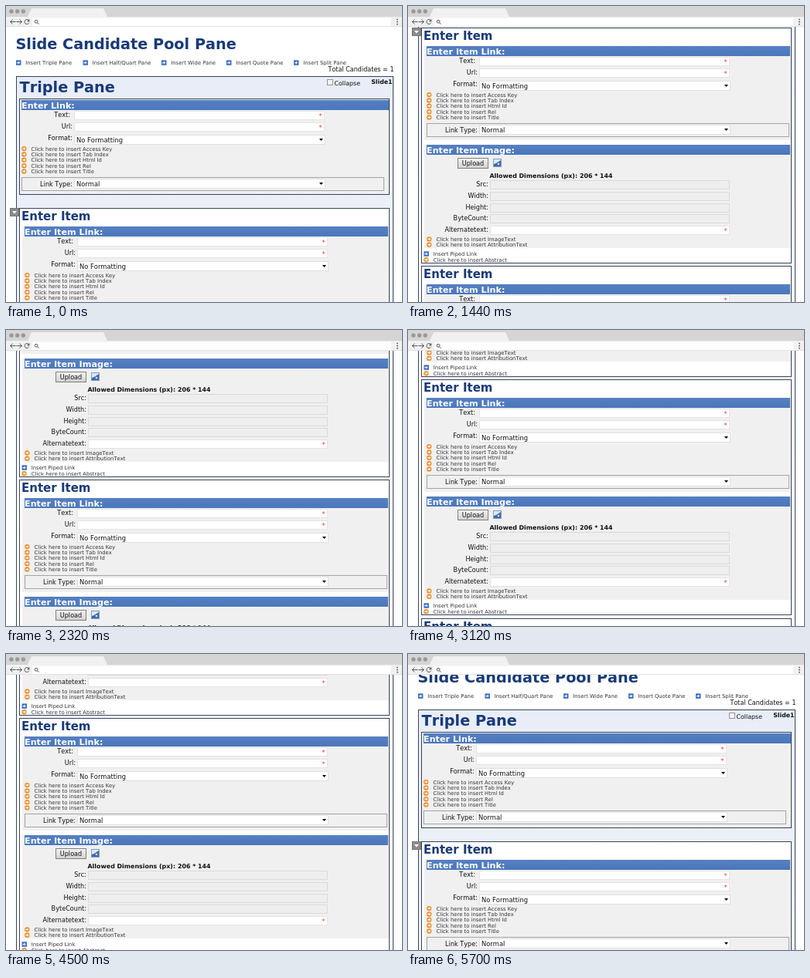
An HTML page with a canvas that plays this animation: 512x384 px, repeating every 5780 ms.

```html
<!DOCTYPE html>
<html lang="en">
<head>
<meta charset="utf-8">
<title>Scrolling form</title>
<style>
html, body { margin: 0; width: 100%; height: 100%; overflow: hidden; background: #fff; }
canvas { display: block; width: 512px; height: 384px; }
</style>
</head>
<body>
<canvas id="stage" width="512" height="384"></canvas>
<script>
const ctx = document.getElementById('stage').getContext('2d');
const W = 512, H = 384, CHROME = 27;
const LOOP = 5780, STEP = 80, RESUME = 4260;
const MAX_SCROLL = 614, DOWN = 13, UP = 31.3;
const NAVY = '#193a78', INK = '#111', LINE = '#39435a', PANEL = '#f0f0f0';
const LABEL = 8.15, SMALL = 6.8;

function fill(x, y, w, h, color) {
  ctx.fillStyle = color;
  ctx.fillRect(x, y, w, h);
}

function box(x, y, w, h, color, border) {
  if (color) fill(x, y, w, h, color);
  ctx.strokeStyle = border;
  ctx.lineWidth = 1;
  ctx.strokeRect(x + .5, y + .5, w - 1, h - 1);
}

function text(str, x, y, size, color = INK, bold = false, align = 'left') {
  ctx.font = `${bold ? 'bold ' : ''}${size}px "DejaVu Sans", Verdana, sans-serif`;
  ctx.fontKerning = 'none';
  ctx.textAlign = align;
  ctx.fillStyle = color;
  ctx.fillText(str, x, y);
}

function label(str, right, y) {
  text(str, right, y, LABEL, INK, false, 'right');
}

function shape(points, color) {
  ctx.fillStyle = color;
  ctx.beginPath();
  points.forEach(([x, y]) => ctx.lineTo(x, y));
  ctx.fill();
}

function path(points, color, width) {
  ctx.strokeStyle = color;
  ctx.lineWidth = width;
  ctx.beginPath();
  points.forEach(([x, y]) => ctx.lineTo(x, y));
  ctx.stroke();
}

function disc(x, y, r, color) {
  ctx.fillStyle = color;
  ctx.beginPath();
  ctx.arc(x, y, r, 0, Math.PI * 2);
  ctx.fill();
}

function arrowGlyph(x, y) {
  fill(x - 2, y - .6, 2.4, 1.2, '#fff');
  shape([[x, y - 2], [x + 2.2, y], [x, y + 2]], '#fff');
}

function blueLink(str, x, y, gap) {
  fill(x - 3, y - 6, 6.5, 6.5, '#3f70c4');
  arrowGlyph(x, y - 2.7);
  text(str, x + gap, y, SMALL, '#333');
}

function orangeLink(str, x, y) {
  disc(x, y - 2.6, 3.2, '#e8902f');
  arrowGlyph(x, y - 2.6);
  text(str, x + 9.3, y, SMALL, '#333');
}

function bar(title, x, y, right) {
  const shade = ctx.createLinearGradient(0, y, 0, y + 13);
  shade.addColorStop(0, '#5680c2');
  shade.addColorStop(1, '#4a77bb');
  fill(x, y, right - x, 13, shade);
  text(title, x, y + 10.5, 11.2, '#fff', true);
}

function input(x, y, w, required = true) {
  box(x, y, w, 12, required ? '#fff' : '#eee', required ? '#e4e4e4' : '#dadada');
  if (required) text('*', x + w - 5.5, y + 9.5, 9, '#e8433c', false, 'center');
}

function select(value, x, y) {
  box(x, y, 325, 13, '#fff', '#e0e0e0');
  text(value, x + 3, y + 9.8, 8.35);
  shape([[x + 317, y + 5], [x + 322, y + 5], [x + 319.5, y + 8]], '#000');
}

function linkForm(title, x, y, right) {
  bar(title, x, y, right);
  label('Text:', x + 63, y + 21.5);
  label('Url:', x + 66, y + 37);
  label('Format:', x + 66, y + 52.3);
  input(x + 68, y + 14, 324);
  input(x + 68, y + 29, 324);
  select('No Formatting', x + 68, y + 45);
  ['Access Key', 'Tab Index', 'Html Id', 'Rel', 'Title'].forEach((name, i) =>
    orangeLink('Click here to insert ' + name, x + 3.3, y + 65.7 + i * 7.35));
  box(x, y + 100, 469, 18, null, '#a4a4a4');
  label('Link Type:', x + 66, y + 112.3);
  select('Normal', x + 68, y + 102);
}

function pictureIcon(x, y) {
  box(x, y, 11, 11, '#dce8f6', '#7f9cc6');
  shape([[x + 1, y + 10], [x + 1, y + 7], [x + 4, y + 6], [x + 10, y + 2], [x + 10, y + 10]], '#3f6aa8');
  disc(x + 7, y + 7, 1.3, '#e6dce0');
}

function imageForm(x, y) {
  bar('Enter Item Image:', x, y, 494);
  const face = ctx.createLinearGradient(0, y + 17, 0, y + 30);
  face.addColorStop(0, '#f5f5f5');
  face.addColorStop(1, '#d2d2d2');
  box(64, y + 17, 40, 14, face, '#808080');
  text('Upload', 84, y + 26.8, LABEL, INK, false, 'center');
  pictureIcon(110, y + 18);
  text('Allowed Dimensions (px): 206 * 144', 105.5, y + 42.6, 7.92, INK, true);
  ['Src:', 'Width:', 'Height:', 'ByteCount:', 'Alternatetext:'].forEach((name, i) => {
    const rowY = 46.4 + i * 14.65;
    label(name, 104, y + rowY + 7.8);
    input(106, y + Math.round(rowY), 310, i === 4);
  });
  orangeLink('Click here to insert ImageText', x + 3.3, y + 125);
  orangeLink('Click here to insert AttributionText', x + 3.3, y + 132.3);
}

function item(y) {
  box(17, y, 479, 306, '#fff', LINE);
  text('Enter Item', 20, y + 15.7, 15, NAVY, true);
  fill(21, y + 24, 474, 122, PANEL);
  linkForm('Enter Item Link:', 24, y + 24, 494);
  fill(21, y + 152, 474, 134, PANEL);
  imageForm(24, y + 152);
  blueLink('Insert Piped Link', 23.5, y + 296.3, 9.3);
  orangeLink('Click here to insert Abstract', 23.5, y + 303.8);
}

function page() {
  text('Slide Candidate Pool Pane', 12.5, 56, 19.25, NAVY, true);
  [['Triple', 16], ['Half/Quart', 102.5], ['Wide', 204], ['Quote', 288], ['Split', 375]].forEach(([name, x]) =>
    blueLink(`Insert ${name} Pane`, x, 76.3, 9.3));
  text('Total Candidates = 1', 501.5, 85.3, 8.05, INK, false, 'right');

  const tint = ctx.createLinearGradient(0, 92, 0, 700);
  tint.addColorStop(0, '#e8edf8');
  tint.addColorStop(.35, '#ebf0f9');
  tint.addColorStop(1, '#fbfcfe');
  box(13, 91, 488, 1110, tint, LINE);
  text('Triple Pane', 17.5, 112, 19.3, NAVY, true);
  box(415, 95, 8, 8, '#f6f6f6', '#959595');
  text('Collapse', 424.5, 102.8, 7.9);
  text('Slide1', 499.5, 100.5, 7.8, INK, true, 'right');

  box(17, 120, 479, 125, PANEL, LINE);
  linkForm('Enter Link:', 20, 122, 495);

  for (let i = 0; i < 3; i++) item(Math.floor(262 + i * 309.5));
  box(5, 262, 12, 11, '#8b8b8b', '#777');
  shape([[8, 266], [14, 266], [11, 269.5]], '#fff');
}

function chrome() {
  fill(0, 0, W, 14, '#d5d5d5');
  [7, 14.7, 22.3].forEach(x => disc(x, 7, 2.7, '#999'));
  shape([[28, 14], [33, 3], [126, 3], [131, 14]], '#f1f1f1');
  fill(0, 14, W, 13, '#f1f1f1');
  fill(34, 15.5, 464, 10.5, '#fff');
  fill(0, 26.5, W, .5, '#d0d0d0');
  const dark = '#555';
  [[9, -1], [17, 1]].forEach(([x, dir]) => {
    path([[x - 3.5, 20.5], [x + 3.5, 20.5]], dark, 1);
    path([[x + dir * .5, 17.5], [x + dir * 3.5, 20.5], [x + dir * .5, 23.5]], dark, 1);
  });
  ctx.beginPath();
  ctx.arc(27, 20.5, 3, .4, 5.5);
  ctx.stroke();
  shape([[30.3, 16.8], [30.3, 20.2], [27, 20.2]], dark);
  ctx.beginPath();
  ctx.arc(39.2, 20.2, 1.9, 0, Math.PI * 2);
  ctx.stroke();
  path([[40.5, 21.5], [42.6, 23.6]], dark, 1);
  [17.3, 20.5, 23.7].forEach(y => disc(506, y, .9, dark));
}

function scrollAt(t) {
  if (t < RESUME) return Math.min(Math.floor(t / STEP) * DOWN, MAX_SCROLL);
  const steps = 1 + Math.floor((t - RESUME) / STEP);
  return Math.max(0, Math.floor(MAX_SCROLL - steps * UP));
}

function draw(scroll) {
  fill(0, 0, W, H, '#fff');
  ctx.save();
  ctx.beginPath();
  ctx.rect(0, CHROME, W, H - CHROME);
  ctx.clip();
  ctx.translate(0, -scroll);
  page();
  ctx.restore();
  chrome();
}

const start = performance.now();
let shown = -1;
function tick() {
  const scroll = scrollAt((performance.now() - start) % LOOP);
  if (scroll !== shown) draw(shown = scroll);
  requestAnimationFrame(tick);
}
tick();
</script>
</body>
</html>
```
